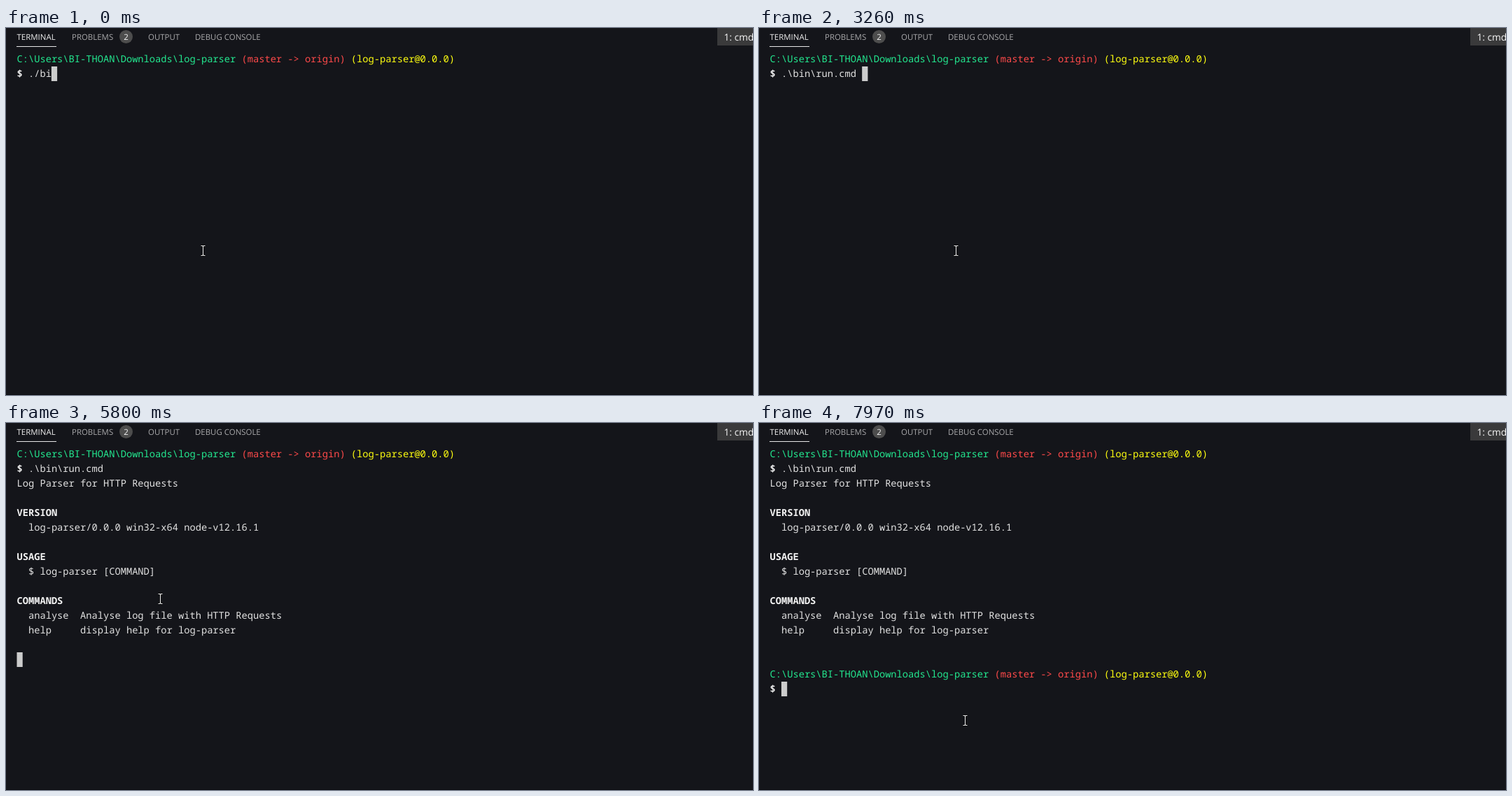
These frames come from a looping animation (1067 by 525 pixels, 8 s). An HTML page with a canvas:

```html
<!DOCTYPE html>
<html lang="en">
<head>
<meta charset="utf-8">
<title>Terminal</title>
<style>
html, body { margin: 0; width: 100%; height: 100%; overflow: hidden; background: #14151a; }
canvas { display: block; }
</style>
</head>
<body>
<canvas id="stage" width="1067" height="525"></canvas>
<script>
const ctx = document.getElementById('stage').getContext('2d');
const LOOP = 8000, LEFT = 15.5, CELL = 8.23, ROW = 21;
const MONO = '13.72px "Noto Sans Mono", "DejaVu Sans Mono", monospace';
const UI = 'px "Open Sans", "Noto Sans", sans-serif';
const PLAIN = '#e2e2e2', BRIGHT = '#f4f4f4', DIM = '#a9a9ab';

// [time, command, cursor shown]
const typing = [
  [0, './bi', 1], [40, './bin', 1], [520, '.\\bin\\', 1], [1150, '.\\bin\\', 0],
  [1340, '.\\bin\\r', 1], [1490, '.\\bin\\ru', 1], [1520, '.\\bin\\run', 1],
  [2050, '.\\bin\\run.cmd ', 1], [2670, '.\\bin\\run.cmd ', 0], [3260, '.\\bin\\run.cmd ', 1]
];

// Lines in capitals are bold headings
const output = [
  'Log Parser for HTTP Requests', '', 'VERSION', '  log-parser/0.0.0 win32-x64 node-v12.16.1', '',
  'USAGE', '  $ log-parser [COMMAND]', '', 'COMMANDS',
  '  analyse  Analyse log file with HTTP Requests', '  help     display help for log-parser'
];

// [time, x, y]
const pointer = [
  [0, 282, 318.5], [4640, 282, 318.5], [5000, 264, 255], [5230, 242, 199], [5430, 228, 190],
  [5560, 228, 190], [5950, 217, 290], [6310, 223.5, 393], [6370, 223.5, 393], [6750, 182, 210],
  [7150, 119, 277], [7300, 124, 278], [7430, 140, 278], [7700, 218, 355], [7970, 294.5, 426], [8000, 294.5, 426]
];

function rect(x, y, w, h, color) {
  ctx.fillStyle = color;
  ctx.fillRect(x, y, w, h);
}

function text(str, x, y, color, font) {
  ctx.font = font;
  ctx.fillStyle = color;
  ctx.fillText(str, x, y);
}

function cell(col, row, color) {
  rect(LEFT + col * CELL, 34 + ROW * row, CELL, ROW, color);
}

function print(str, col, row, color = PLAIN, weight = 500) {
  text(str, LEFT + col * CELL, 49 + ROW * row, color, weight + ' ' + MONO);
}

function prompt(row, command) {
  print('C:\\Users\\BI-THOAN\\Downloads\\log-parser', 0, row, '#23e890');
  print('(master -> origin)', 39, row, '#ff4a4a');
  print('(log-parser@0.0.0)', 58, row, '#ffff10');
  print('$', 0, row + 1, BRIGHT, 700);
  print(command, 2, row + 1);
}

function tabs(t) {
  const small = 11.45 + UI;
  text('TERMINAL', 15.5, 17, '#f0f0f0', small);
  rect(15, 26, 57, 1, '#e7e7e7');
  text('PROBLEMS', 94, 17, DIM, small);
  text('OUTPUT', 203, 17, DIM, small);
  text('DEBUG CONSOLE', 270, 17, DIM, small);
  ctx.beginPath();
  ctx.arc(171.5, 12.5, 9.5, 0, 7);
  ctx.fillStyle = '#4d4d4d';
  ctx.fill();
  text('2', 168.2, 17, '#f8f8f8', 11.5 + UI);
  rect(1016, 0, 51, 25, '#3a3a3b');
  text(t >= 3820 && t < 5600 ? '1: node' : '1: cmd', 1025.5, 18, '#f8f8f8', 13.7 + UI);
}

function terminal(t) {
  const [, command, blink] = typing.findLast(step => step[0] <= t);
  let cursor = [2 + command.length, 1], shown = blink;
  if (t >= 3700) cursor = [0, 2];
  if (t >= 5200) cursor = [0, 9];
  if (t >= 5260) {
    cursor = [0, 14];
    shown = t < 5860;
  }
  if (t >= 6270) {
    cursor = [2, 16];
    shown = t < 6870 || t >= 7470;
  }
  if (shown) cell(...cursor, '#cccccc');
  if (t >= 7400 && t < 7500) cell(13, 11, '#505156');

  prompt(0, command);
  const lines = t < 5200 ? 0 : t < 5260 ? 7 : output.length;
  output.slice(0, lines).forEach((line, i) => {
    const heading = /^[A-Z]+$/.test(line);
    print(line, 0, i + 2, heading ? BRIGHT : PLAIN, heading ? 700 : 500);
  });
  if (t >= 6270) prompt(15, '');
}

function ibeam(t) {
  const i = Math.max(1, pointer.findIndex(p => p[0] > t));
  const [a, b] = [pointer[i - 1], pointer[i]];
  const k = (t - a[0]) / (b[0] - a[0]);
  const x = Math.round(a[1] + (b[1] - a[1]) * k) - 0.5;
  const y = Math.round(a[2] + (b[2] - a[2]) * k) - 0.5;
  const shape = new Path2D('M-3 -7H-1L0 -6L1 -7H3M0 -6V6M-3 7H-1L0 6L1 7H3');
  ctx.save();
  ctx.translate(x, y);
  for (const [width, color] of [[2.4, '#08080a'], [1.1, '#ececec']]) {
    ctx.lineWidth = width;
    ctx.strokeStyle = color;
    ctx.stroke(shape);
  }
  ctx.restore();
}

function draw(now) {
  const t = now % LOOP;
  rect(0, 0, 1067, 525, '#14151a');
  rect(0, 524, 1067, 1, '#0c0d11');
  ctx.textRendering = 'geometricPrecision';
  tabs(t);
  terminal(t);
  ibeam(t);
  requestAnimationFrame(draw);
}

requestAnimationFrame(draw);
</script>
</body>
</html>
```
